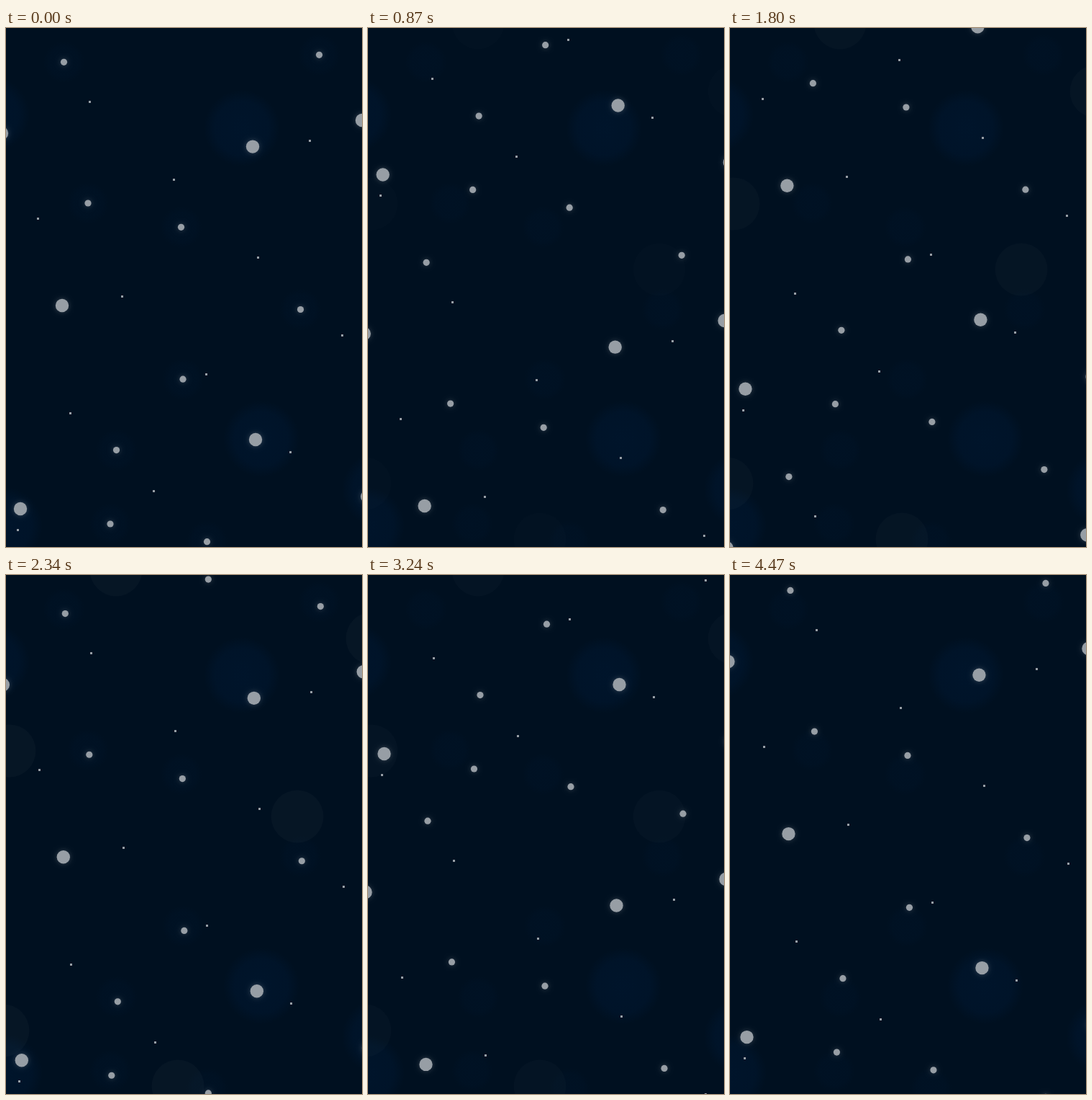
Recreate the animation shown at these times as an HTML page with a canvas. Size 495 by 720 pixels, loop 4.5 s.

```html
<!DOCTYPE html>
<html lang="en">
<head>
<meta charset="utf-8">
<title>Drifting lights</title>
<style>
html, body { margin: 0; width: 100%; height: 100%; overflow: hidden; background: #001020; }
canvas { display: block; }
</style>
</head>
<body>
<canvas id="stage" width="495" height="720"></canvas>
<script>
const W = 495, H = 720, LOOP = 4500, STEP = 30;
const FALL = 0.3196, DRIFT = 0.00077; // px per ms
const SHEETS = [0, -741.6, -1454.5];  // start heights of the falling copies
const ctx = document.getElementById('stage').getContext('2d');

const glows = [[328, 139], [355, 570], [-20, 120], [-2, 690], [520, 640]];
const discs = [[153, -7], [509, 88], [5, 244], [405, 335], [-4, 632], [239, 709]];
const bigDots = [[343, 164.6], [347, 571], [20, 667], [78, 385], [-6, 146], [495, 128], [502.3, 650]];
const smallDots = [
  [80.5, 47.3], [435.5, 37.3], [114, 243], [243.5, 276.3], [409.5, 390.5],
  [246, 487.2], [153.5, 585.6], [145, 688], [279.5, 712.7]
];

// Specks spread evenly downwards, scattered across by the golden ratio
const specks = Array.from({ length: 12 }, (_, i) => [
  W * ((0.235 + i * 0.618) % 1),
  102 + 54 * i
]);

function circle(x, y, r) {
  ctx.beginPath();
  ctx.arc(x, y, r, 0, Math.PI * 2);
  ctx.fill();
}

function drawGlow(x, y, r, alpha) {
  const light = ctx.createRadialGradient(x, y, 0, x, y, r);
  light.addColorStop(0, `rgba(0, 40, 90, ${alpha})`);
  light.addColorStop(0.7, `rgba(0, 40, 90, ${alpha * 0.8})`);
  light.addColorStop(1, 'rgba(0, 40, 90, 0)');
  ctx.fillStyle = light;
  circle(x, y, r);
}

function drawSheet(dx, dy) {
  ctx.shadowBlur = 7;
  for (const [x, y] of bigDots) circle(x + dx, y + dy, 9.2);
  for (const [x, y] of smallDots) circle(x + dx, y + dy, 4.6);
  ctx.shadowBlur = 0;
  for (const [x, y] of specks) {
    ctx.fillRect(Math.round(x + dx) - 1, Math.round(y + dy) - 1, 3, 3);
  }
}

function draw(t) {
  ctx.fillStyle = '#001020';
  ctx.fillRect(0, 0, W, H);
  for (const [x, y] of glows) drawGlow(x, y, 53, 0.19);
  for (const [x, y] of smallDots) drawGlow(x, y, 29, 0.07);

  const fade = Math.sin(Math.PI * t / LOOP) ** 1.6;
  ctx.fillStyle = `rgba(255, 255, 255, ${0.023 * fade})`;
  for (const [x, y] of discs) circle(x, y, 36.5);

  ctx.fillStyle = '#979ea5';
  ctx.shadowColor = 'rgba(255, 255, 255, 0.2)';
  for (const start of SHEETS) drawSheet(t * DRIFT, start + t * FALL);
}

const begin = performance.now();
function tick() {
  const t = (performance.now() - begin) % LOOP;
  draw(Math.floor(t / STEP) * STEP);
  requestAnimationFrame(tick);
}
tick();
</script>
</body>
</html>
```
